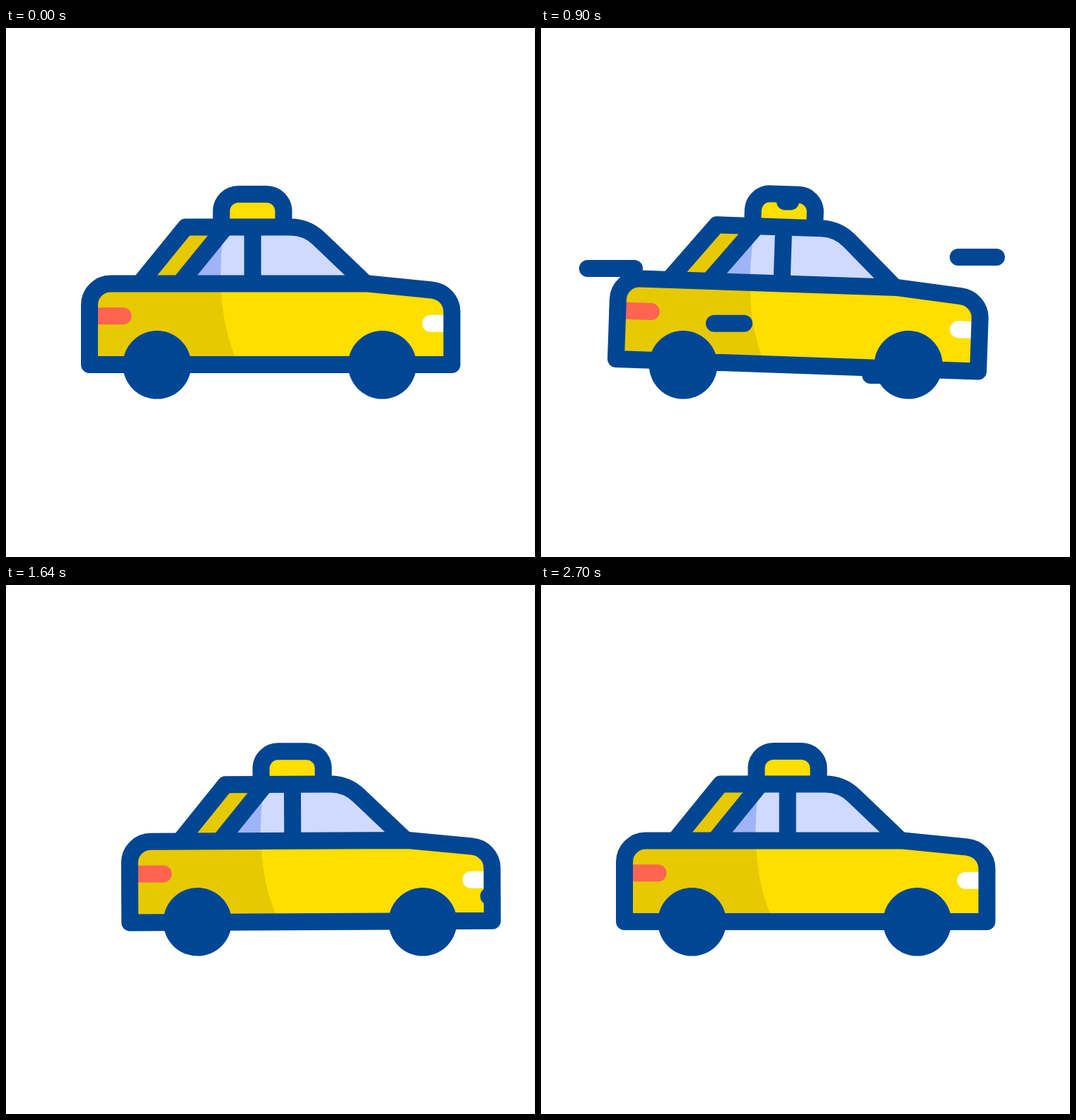
An HTML page that plays this animation: 748x748 px, repeating every 2.8 s.

```html
<!DOCTYPE html>
<html lang="en">
<head>
<meta charset="utf-8">
<title>Taxi</title>
<style>
  html, body { margin: 0; width: 100%; height: 100%; overflow: hidden; background: #fff; }
  svg { display: block; width: 100%; height: 100%; }
  .line { fill: none; stroke: #004694; stroke-width: 24; stroke-linejoin: round; }
  .cap { fill: none; stroke-width: 24; stroke-linecap: round; }
</style>
</head>
<body>
<svg viewBox="0 0 748 748">
  <defs>
    <path id="hull" d="M118 476V391.5a30 30 0 0 1 30-30H512L602 370.5C618 372 630.5 385 630.5 401V476Z"/>
    <path id="roof" d="M189 361.5L254 281.5H402C417 281.5 431 287 442 297.5L509 361.5"/>
    <path id="sign" d="M304.5 281.5V259a24 24 0 0 1 24-24h40a24 24 0 0 1 24 24V281.5"/>
  </defs>
  <g id="car">
    <g id="body">
      <use href="#hull" fill="#ffdf00"/>
      <use href="#sign" fill="#ffdf00"/>
      <use href="#roof" fill="#d0daff"/>
      <path fill="#9fb4f8" d="M246 361L307 293C304 318 303.5 335 303.5 361Z"/>
      <path fill="#e6c900" d="M189 361.5L254 281.5H310.5L245.5 361.5Z"/>
      <path fill="#e6c900" d="M118 476V391.5a30 30 0 0 1 30-30H304C304.5 395 310 430 324 465V476Z"/>
      <path class="cap" stroke="#ff6451" d="M118 407.3H165.5"/>
      <path class="cap" stroke="#fff" d="M600.5 417.7H630"/>
      <use href="#sign" class="line"/>
      <use href="#roof" class="line"/>
      <path class="line" d="M310.5 281.5L245.5 361.5M348.7 281.5V361.5"/>
      <use href="#hull" class="line"/>
    </g>
    <g fill="#004694">
      <circle cx="213.5" cy="476.3" r="48.3"/>
      <circle cx="532" cy="476.3" r="48.3"/>
    </g>
  </g>
  <g id="streaks" stroke="#004694"></g>
</svg>
<script>
const LOOP = 2800, STEP = 20;
const START = 200, BACK = 660, FRONT = 1520, END = 2700;
const RUN = 560, DELAY = 200; // travel time of a streak, lag of its tail

const car = document.getElementById('car');
const body = document.getElementById('body');
const layer = document.getElementById('streaks');

const clamp = u => Math.min(1, Math.max(0, u));
const sine = u => (1 - Math.cos(Math.PI * u)) / 2;
const part = (t, from, to) => clamp((t - from) / (to - from));

// Drop back, surge ahead, then roll home.
function shift(t) {
  return -28 * sine(part(t, START, BACK))
    + 86 * sine(part(t, BACK, FRONT))
    - 58 * Math.pow(part(t, FRONT, END), 1.9);
}

// Five half swings on top of one slow wave.
function tilt(t) {
  const swing = Math.min(5, Math.max(0, (t - START) / 485));
  return 0.25 * Math.sin(2 * Math.PI * part(t, START, END)) - 1.75 * Math.sin(Math.PI * swing);
}

function streak(start, y, from, to) {
  const path = document.createElementNS('http://www.w3.org/2000/svg', 'path');
  path.setAttribute('class', 'cap');
  layer.append(path);
  const at = age => from + (to - from) * sine(clamp(age / RUN));
  return t => {
    const age = t - start;
    const shown = age >= 0 && age <= RUN + DELAY;
    path.setAttribute('d', shown ? `M${at(age)} ${y}H${at(age - DELAY) + 0.01}` : '');
  };
}

const streaks = [
  streak(205, 245.5, 590, 345),
  streak(265, 491, 582, 466),
  streak(328, 417.7, 411, 245),
  streak(430, 340, 199, 57),
  streak(604, 324, 652, 538),
  streak(1619, 440, 683, 537),
  streak(1750, 245.5, 274, 96),
  streak(1776, 454.7, 256, 96),
  streak(1879, 331.3, 460, 278)
];

function draw(t) {
  const angle = tilt(t);
  car.setAttribute('transform', `translate(${shift(t)} 0)`);
  body.setAttribute('transform', `translate(0 ${0.4 * Math.abs(angle)}) rotate(${angle} 374 485)`);
  streaks.forEach(move => move(t));
}

const begin = performance.now();
function tick() {
  const t = (performance.now() - begin) % LOOP;
  draw(Math.floor(t / STEP) * STEP);
  requestAnimationFrame(tick);
}
tick();
</script>
</body>
</html>
```
